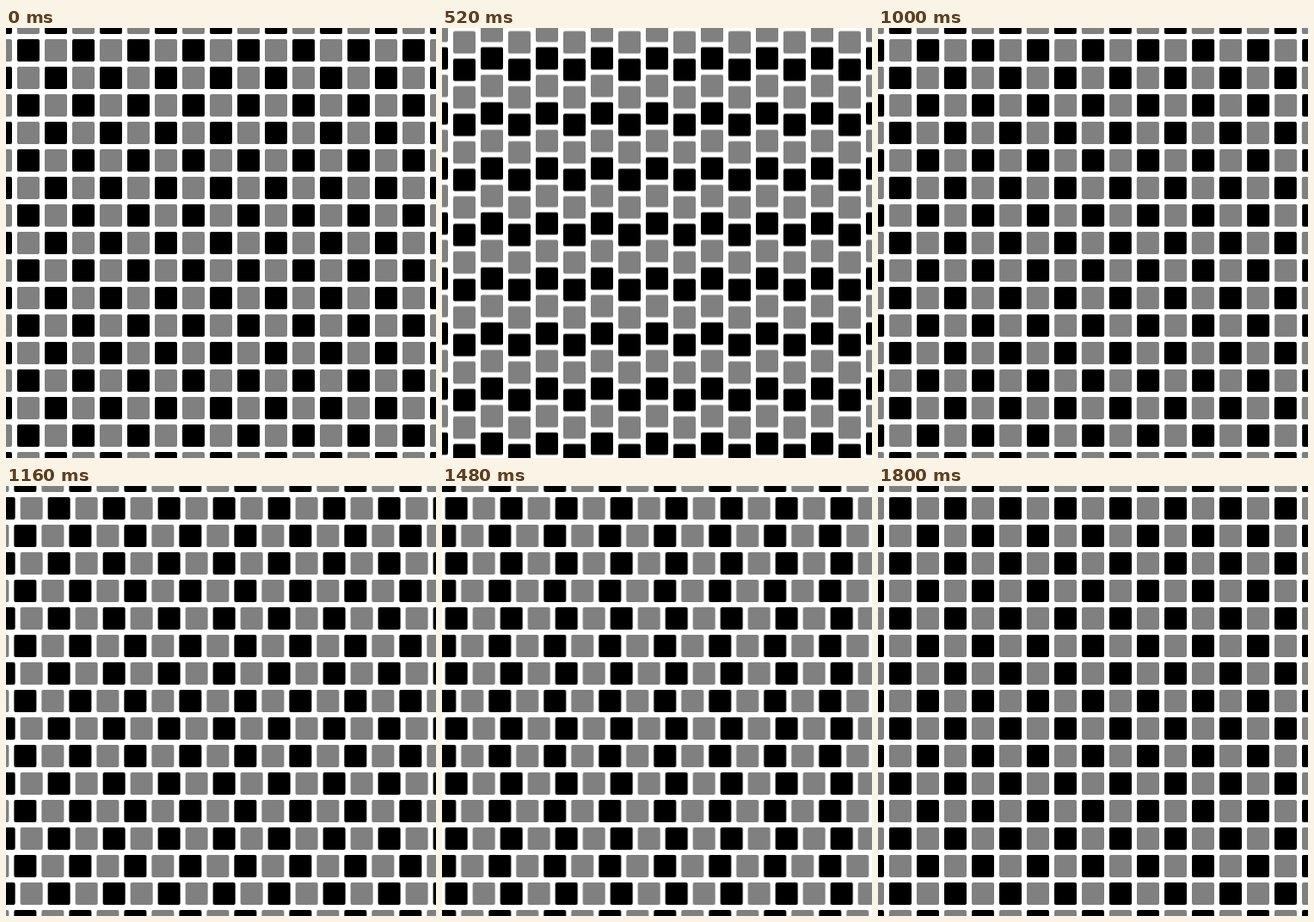
An HTML page with a canvas that plays this animation: 500x500 px, repeating every 1920 ms.

```html
<!DOCTYPE html>
<html lang="en">
<head>
<meta charset="utf-8">
<title>Sliding squares</title>
<style>
  html, body { margin: 0; width: 100%; height: 100%; overflow: hidden; background: #fff; }
  canvas { display: block; width: 100vw; height: 100vh; }
</style>
</head>
<body>
<canvas id="stage" width="500" height="500"></canvas>
<script>
const SIZE = 500, PITCH = 32, CELL = 26, START = 13, RADIUS = 2;
const STEP = 40, HALF = 24, MOVE = 21;   // ms per step, steps per half loop, steps in motion
const SAMPLES = 6, SHUTTER = 0.7;        // motion blur, in steps

const ctx = document.getElementById('stage').getContext('2d');
const layer = document.createElement('canvas');
layer.width = layer.height = SIZE;
const pen = layer.getContext('2d');

const clamp = p => Math.min(1, Math.max(0, p));
const ease = p => p < 0.5 ? 2 * p * p : 1 - 2 * (1 - p) * (1 - p);

function drawGrid(sideways, shift) {
  pen.fillStyle = '#fff';
  pen.fillRect(0, 0, SIZE, SIZE);
  for (const parity of [0, 1]) {
    pen.fillStyle = parity === Number(sideways) ? '#000' : '#808080';
    pen.beginPath();
    for (let row = -2; row <= 16; row++) {
      for (let col = -2; col <= 16; col++) {
        if (Math.abs(row + col) % 2 !== parity) continue;
        const lane = sideways ? row : col;
        const move = lane % 2 ? -shift : shift;
        const x = START + PITCH * col + (sideways ? move : 0);
        const y = START + PITCH * row + (sideways ? 0 : move);
        pen.roundRect(x, y, CELL, CELL, RADIUS);
      }
    }
    pen.fill();
  }
}

function draw(now) {
  const step = Math.floor(now / STEP) % (2 * HALF);
  const sideways = step >= HALF;
  const local = step % HALF;
  const moving = local > 0 && local < MOVE;
  const count = moving ? SAMPLES : 1;

  // Running average of the samples
  for (let k = 0; k < count; k++) {
    const offset = moving ? ((k + 0.5) / count - 0.5) * SHUTTER : 0;
    drawGrid(sideways, PITCH * ease(clamp((local + offset) / MOVE)));
    ctx.globalAlpha = 1 / (k + 1);
    ctx.drawImage(layer, 0, 0);
  }
}

const begin = performance.now();
function tick() {
  draw(performance.now() - begin);
  requestAnimationFrame(tick);
}
tick();
</script>
</body>
</html>
```
